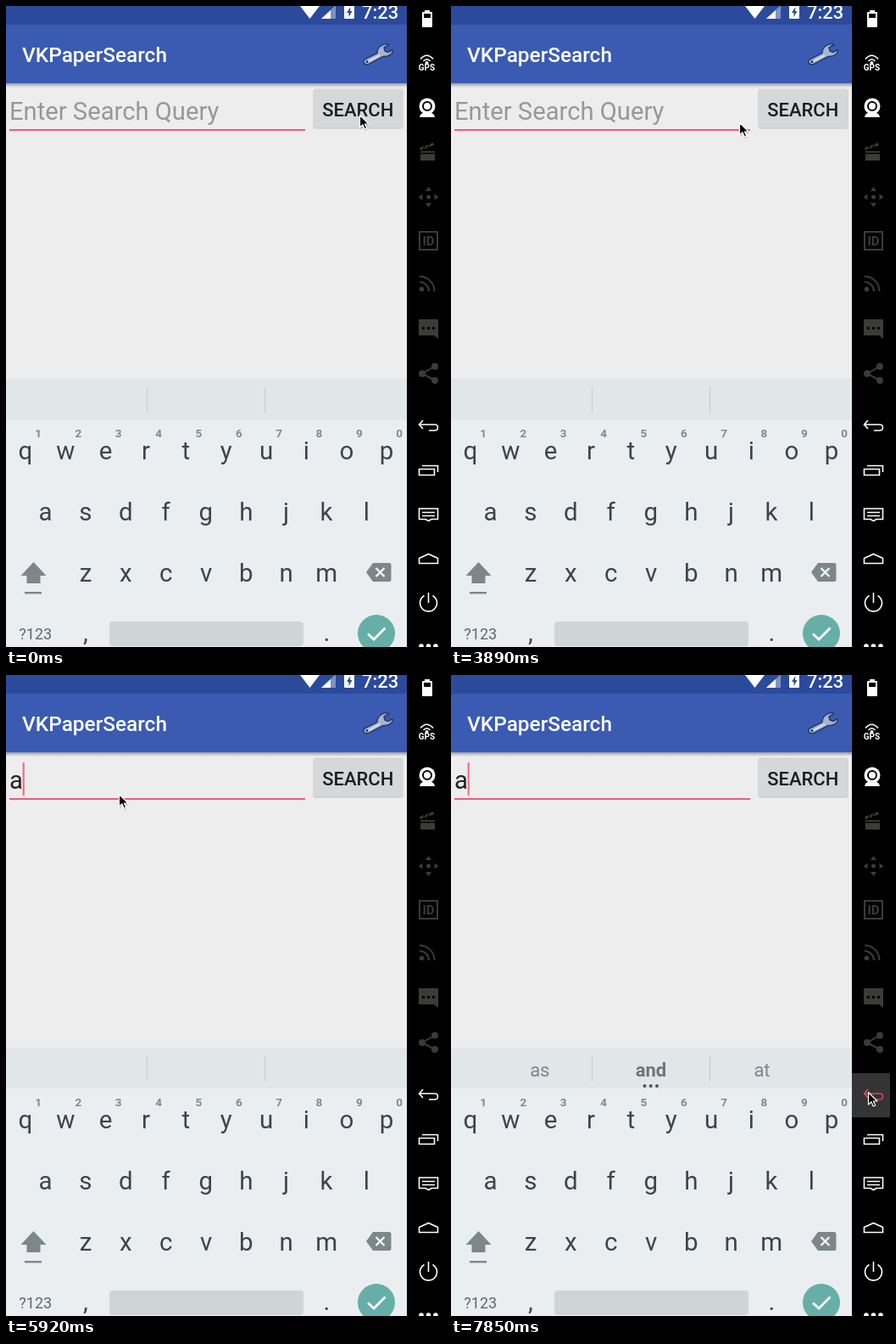
Recreate the animation shown at these times as an HTML page. Size 518 by 755 pixels, loop 8 s.

```html
<!DOCTYPE html>
<html lang="en">
<head>
<meta charset="utf-8">
<title>Search screen</title>
<style>
html, body { margin: 0; width: 100%; height: 100%; overflow: hidden; background: #000; }
svg { display: block; width: 100vw; height: 100vh; }
text { font-family: Roboto, "Noto Sans", sans-serif; }
.mid { text-anchor: middle; }
.med { font-weight: 500; }
.line { fill: none; stroke: #fff; stroke-width: 1.6; }
.dim { fill: #3b3b39; }
.dimline { fill: none; stroke: #3b3b39; stroke-width: 2; }
</style>
</head>
<body>
<svg viewBox="0 0 518 755" preserveAspectRatio="none">
  <defs>
    <linearGradient id="shade" x1="0" y1="0" x2="0" y2="1">
      <stop offset="0" stop-color="#9a9da4"/>
      <stop offset="1" stop-color="#ededed"/>
    </linearGradient>
  </defs>

  <!-- app -->
  <rect width="473" height="755" fill="#ededed"/>
  <rect width="473" height="22" fill="#2b4a9b"/>
  <rect y="22" width="473" height="69" fill="#3a5bb1"/>
  <rect y="91" width="473" height="5" fill="url(#shade)"/>
  <g fill="#fff">
    <path d="M347 0H370L358.500 15Z"/>
    <path d="M389 0V15H372L388 0Z" opacity=".4"/>
    <path d="M383 5V15H372Z"/>
    <path d="M399 0H411V14Q411 15 410 15H400Q399 15 399 14Z"/>
    <path d="M406.500 1L402 8H404.500V13L408.500 6H406Z" fill="#2b4a9b"/>
    <text class="med" x="420" y="15" font-size="22">7:23</text>
    <text class="med" x="19" y="66" font-size="24.4">VKPaperSearch</text>
  </g>
  <path d="M423 63L438 55.500C438 49 443 45 449 44.500L452 45.500L446 49L447 53L451 54.500L456 51.500C457 56 452 60 445 59.500L428 68.500C423 70 420 66 423 63Z"
    fill="#a9b5cf" stroke="#263a70" stroke-width="1.5" stroke-linejoin="round"/>
  <path d="M427 65.500L441 58" stroke="#e0e5ef" stroke-width="1.500"/>
  <circle cx="426" cy="65.500" r="1.500" fill="#263a70"/>

  <rect x="362.500" y="98.500" width="106" height="46" rx="2.500" fill="#c4c5c7"/>
  <rect x="362.500" y="97.500" width="106" height="46" rx="2.500" fill="#d6d7d8"/>
  <text class="mid med" x="415.300" y="129.500" font-size="22" fill="#1c1c1d">SEARCH</text>

  <text id="hint" x="4" y="134" font-size="29.2" fill="#979797">Enter Search Query</text>
  <text id="typed" x="4" y="134" font-size="29.2" fill="#222">a</text>
  <rect id="under" x="4.500" y="137" width="15" height="1.600" fill="#222"/>
  <rect x="4" y="145" width="349" height="2" fill="#ec5a84"/>
  <rect id="caret" y="103" width="2.200" height="39" fill="#ef6f96"/>

  <!-- keyboard -->
  <rect y="439" width="473" height="48" fill="#e1e6e9"/>
  <rect y="487" width="473" height="268" fill="#eaeef1"/>
  <path d="M166.500 449V479M305.500 449V479" stroke="#cbd0d3" stroke-width="1.300"/>
  <g id="words" class="mid" font-size="22" fill="#7d878b">
    <text x="104.800" y="473">as</text>
    <text x="236" y="473" font-weight="700" fill="#6b767b">and</text>
    <text x="367" y="473">at</text>
    <g fill="#4b565b">
      <circle cx="228.500" cy="484" r="2"/><circle cx="235.700" cy="484" r="2"/><circle cx="243" cy="484" r="2"/>
    </g>
  </g>
  <g id="keys" class="mid" font-size="29.5" fill="#39464c"></g>
  <g fill="#7c878b">
    <path d="M32.500 655L47.500 671H40.500V680H24.500V671H17.500Z"/>
    <rect x="22" y="690" width="20" height="2.400"/>
    <path d="M425 667L433 656H452Q454.500 656 454.500 658.500V675.500Q454.500 678 452 678H433Z"/>
  </g>
  <path d="M436.500 662L446.500 672M446.500 662L436.500 672" stroke="#f2f5f6" stroke-width="2.400"/>
  <text class="mid" x="34.800" y="746" font-size="18" fill="#5d696f">?123</text>
  <rect x="122" y="725" width="229" height="29" rx="4" fill="#cfd4d7"/>
  <circle cx="437" cy="739" r="22" fill="#66afa8"/>
  <path d="M427 739.500L434 746L447.500 732.500" fill="none" stroke="#fff" stroke-width="2.800"/>

  <!-- side tools -->
  <rect x="473" width="45" height="755" fill="#000"/>
  <g fill="#fff">
    <path d="M494 5H500V7H502Q503 7 503 8V24Q503 25 502 25H492Q491 25 491 24V8Q491 7 492 7H494Z"/>
    <rect x="493" y="9" width="8" height="5" fill="#000"/>
    <circle cx="496.500" cy="67" r="2"/>
    <text class="mid" x="496.500" y="76" font-size="10" font-weight="700">GPS</text>
    <circle cx="497" cy="118" r="9.500"/>
    <path d="M488 131Q489 126 493 126H501Q505 126 506 131Z"/>
    <circle cx="497" cy="118" r="5" fill="none" stroke="#000" stroke-width="2"/>
  </g>
  <path class="line" d="M492.500 65Q496.500 60.500 500.500 65M489 62.500Q496.500 54 504 62.500"/>
  <g class="dim">
    <path d="M489 171H506V182H489ZM488 167L504 161L505 164L489 170Z"/>
    <path d="M498.500 213L502 218H495ZM498.500 237L502 232H495ZM486.500 225L491.500 221.500V228.500ZM510.500 225L505.500 221.500V228.500Z"/>
    <circle cx="498.500" cy="225" r="2.500"/>
    <text class="mid" x="498.500" y="282" font-size="15" font-weight="700">ID</text>
    <circle cx="490.500" cy="333.500" r="2.800"/>
    <path d="M487 369H510V392L505 388H487Z"/>
    <circle cx="491" cy="433" r="4"/><circle cx="506" cy="424.500" r="4"/><circle cx="506" cy="441" r="4"/>
  </g>
  <path d="M492 169L495 164M497 167.500L500 162.500M489 173.500H506" stroke="#000" stroke-width="1.300"/>
  <path class="dimline" d="M488 266H509V287H488ZM506 424.500L491 433L506 441"/>
  <path class="dimline" d="M488 325A11 11 0 0 1 499 336M488 318.500A17.500 17.500 0 0 1 505.500 336" stroke-width="3.200"/>
  <circle cx="492.500" cy="379.500" r="1.700"/><circle cx="498.500" cy="379.500" r="1.700"/><circle cx="504.500" cy="379.500" r="1.700"/>
  <rect id="press" x="473" y="469" width="45" height="52" fill="#343434"/>
  <path id="back" class="line" d="M492 488L487.500 493L492 498M487.500 493H506Q509.500 493 509.500 496.500Q509.500 500 506 500H499"/>
  <path class="line" d="M487.500 545.500H505.500V552.500H487.500ZM491 541.500H509.500V549"/>
  <path class="line" d="M487.500 592H509.500V604.500H502L498.500 606.500L495 604.500H487.500ZM491 596.500H506M491 600.500H506"/>
  <path class="line" d="M487.500 656.500V650.500L498.500 645.500L509.500 650.500V656.500Z"/>
  <path class="line" d="M493.500 694.500A10 10 0 1 0 503.500 694.500M498.500 691V703"/>
  <g fill="#fff"><circle cx="490" cy="754" r="2.800"/><circle cx="498.500" cy="754" r="2.800"/><circle cx="507" cy="754" r="2.800"/></g>

  <g id="mouse" stroke-linejoin="round">
    <path d="M1 2V17L4.500 13.800L6.700 19L9.200 18L7 13H11.500Z" opacity=".22"/>
    <path d="M.5 .5V15L4 11.800L6.200 17L8.700 16L6.500 11H11Z" stroke="#fff" stroke-width="1.200"/>
  </g>
</svg>
<script>
const LOOP = 8000;
const $ = id => document.getElementById(id);

function key(ch, x, y, extra = "") {
  return `<text x="${x}" y="${y}" ${extra}>${ch}</text>`;
}

function row(chars, x, y, extra) {
  return [...chars].map((ch, i) => key(ch, x + i * 47.35, y, extra)).join("");
}

$("keys").innerHTML =
  row("qwertyuiop", 23, 534) +
  row("1234567890", 38, 508, 'font-size="13.5" font-weight="700" fill="#7f898e"') +
  row("asdfghjkl", 46.5, 606) +
  row("zxcvbnm", 94, 678) +
  key(",", 94, 748) + key(".", 378.5, 748);

// pointer stops: time, x, y
const stops = [
  [0, 417, 128], [2100, 406, 129], [2400, 406, 130],
  [3600, 392, 133], [3750, 340, 137], [3900, 270, 136], [4050, 205, 131],
  [4180, 165, 125], [4330, 146, 120], [4480, 141, 118],
  [5770, 137, 133], [5920, 133, 140],
  [6220, 150, 158], [6370, 205, 215], [6670, 290, 300], [6820, 375, 380],
  [6970, 440, 435], [7110, 472, 460], [7260, 480, 467], [7410, 488, 483], [7560, 492, 491]
];
// caret flips, starting hidden
const flips = [300, 750, 1350, 1800, 2400, 2850, 3300, 3750, 4330, 6670, 7110, 7560, 7850];

function show(id, on) {
  $(id).setAttribute("visibility", on ? "visible" : "hidden");
}

function draw(t) {
  const typed = t >= 5770, pressed = t >= 7560;
  const [, x, y] = stops.filter(s => s[0] <= t).pop();
  $("mouse").setAttribute("transform", `translate(${x} ${y})`);
  show("hint", !typed);
  show("typed", typed);
  show("under", t >= 6670 && t < 7850);
  show("words", t >= 6220);
  show("caret", flips.filter(f => f <= t).length % 2);
  $("caret").setAttribute("x", typed ? 19.6 : 4.2);
  show("press", pressed);
  $("back").style.stroke = pressed ? "#d8466a" : "#fff";
}

const start = performance.now();
function tick() {
  draw((performance.now() - start) % LOOP);
  requestAnimationFrame(tick);
}
tick();
</script>
</body>
</html>
```
